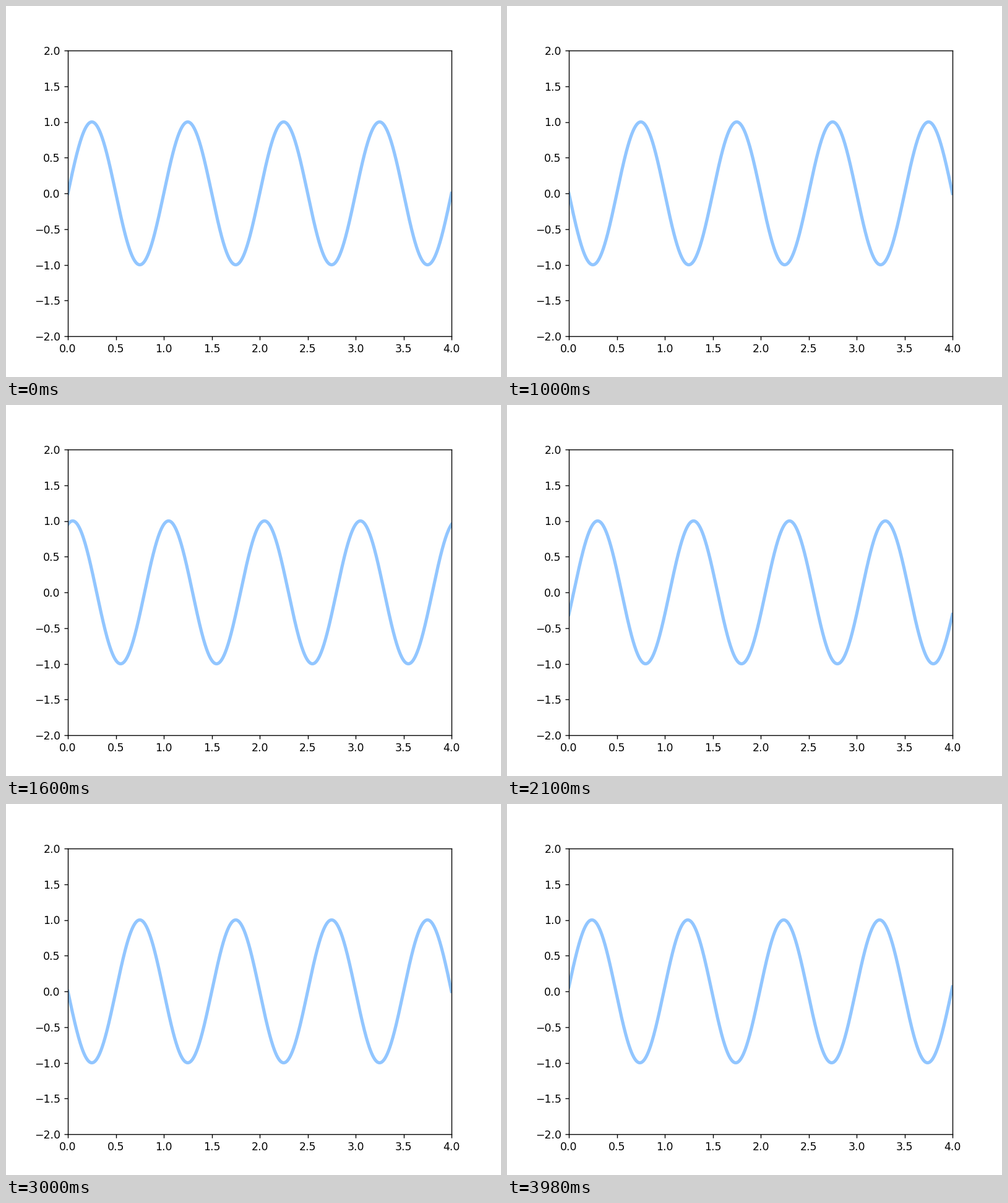
Write a matplotlib script that moves like this. It is 800 px wide and 600 px high and loops after 4 s.

```python
import numpy as np
import matplotlib.pyplot as plt
from matplotlib.animation import FuncAnimation

FRAMES = 200
INTERVAL = 20  # ms

fig = plt.figure(figsize=(6.4, 4.8), dpi=125)
ax = plt.axes(xlim=(0, 4), ylim=(-2, 2))
x = np.linspace(0, 4, 1000)
line, = ax.plot(x, np.sin(2 * np.pi * x), color="#92C6FF", lw=3)


def update(i):
    """Shift the wave right by a hundredth of its period per frame."""
    line.set_ydata(np.sin(2 * np.pi * (x - 0.01 * i)))
    return line,


anim = FuncAnimation(fig, update, frames=FRAMES, interval=INTERVAL,
                     repeat=True, repeat_delay=0)
plt.show()
```
